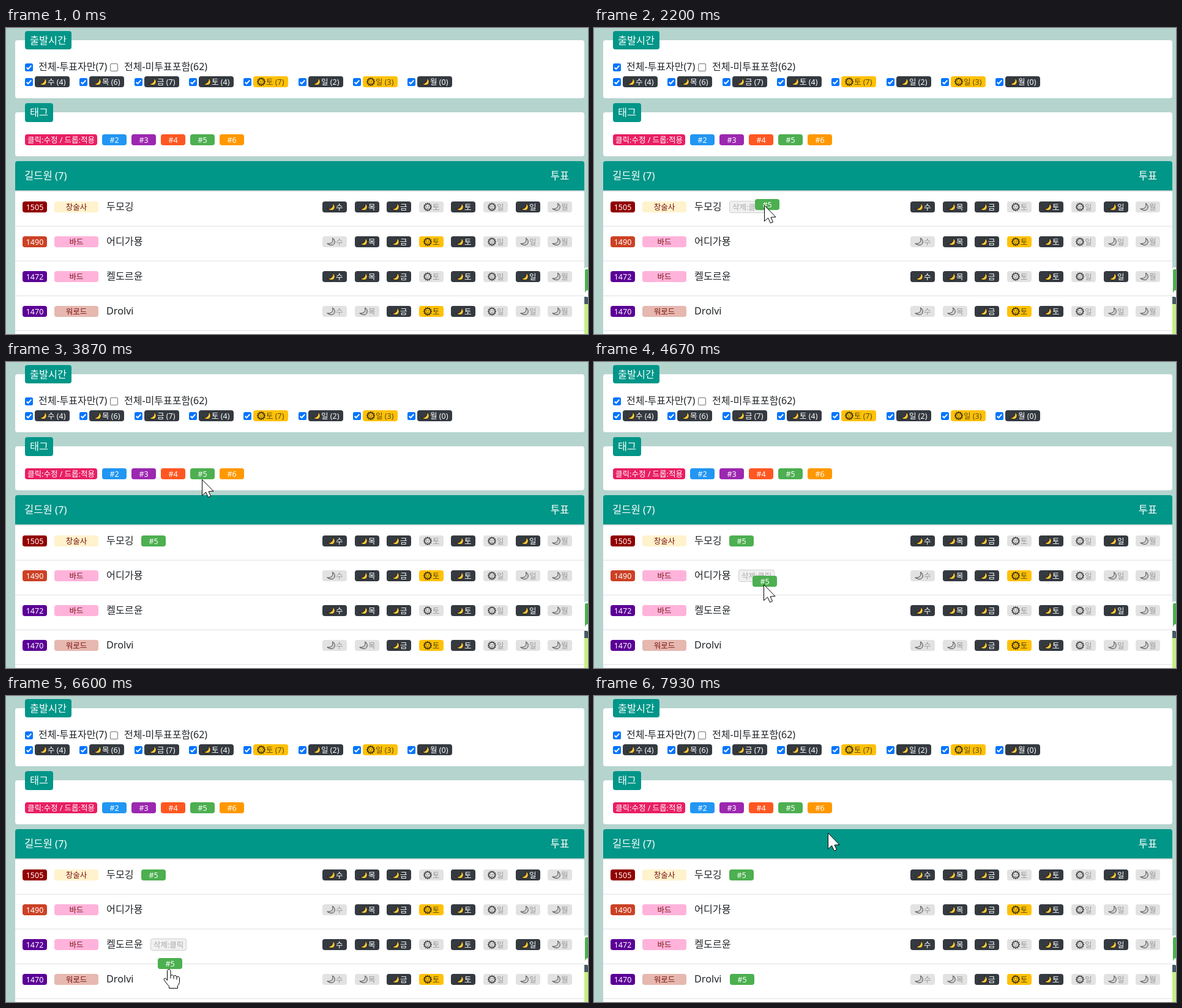
Recreate the animation shown at these times as an HTML page with a canvas. Size 951x501 px, loop 8 s.

```html
<!DOCTYPE html>
<html lang="ko">
<head>
<meta charset="utf-8">
<title>길드원 투표</title>
<style>
html, body { margin: 0; width: 100%; height: 100%; overflow: hidden; background: #b5d4ce; }
canvas { display: block; }
</style>
</head>
<body>
<canvas id="stage" width="951" height="501"></canvas>
<script>
const ctx = document.getElementById('stage').getContext('2d');
const FONT = '"Noto Sans", "Noto Sans CJK KR", "Noto Sans CJK", sans-serif';
const LOOP = 8000, TICK = LOOP / 120, ROW_H = 57;
const TEAL = '#009688', DARK = '#343a40', AMBER = '#ffc107', INK = '#212529', GREEN = '#4caf50';

// A star marks a daytime slot
const times = ['수 (4)', '목 (6)', '금 (7)', '토 (4)', '*토 (7)', '일 (2)', '*일 (3)', '월 (0)'];
const voteDays = ['수', '목', '금', '*토', '토', '*일', '일', '월'];

const members = [
  { level: '1505', color: '#910000', job: '창술사', jobColor: '#fff2cc', name: '두모깅', votes: '11101010', tagX: 221 },
  { level: '1490', color: '#cc4125', job: '바드', jobColor: '#ffb3da', name: '어디가묭', votes: '01111000', tagX: 236 },
  { level: '1472', color: '#5b0096', job: '바드', jobColor: '#ffb3da', name: '켈도르윤', votes: '11101010', tagX: 236 },
  { level: '1470', color: '#5b0096', job: '워로드', jobColor: '#e6b8af', name: 'Drolvi', votes: '00111000', tagX: 222 }
];

const tags = ['#2196f3', '#9c27b0', '#ff5722', GREEN, '#ff9800']
  .map((color, i) => ({ x: 157 + i * 48, w: 40, text: '#' + (i + 2), color }));
tags.unshift({ x: 31, w: 118, text: '클릭:수정 / 드롭:적용', color: '#e91e63' });

// Pointer path: tick, x, y, ticks to wait there
const path = [
  [5, 915, 468], [7, 785, 414], [8, 850, 412, 1], [14, 425, 212], [15, 372, 195],
  [20, 316, 184, 4], [25, 307, 194], [31, 281, 280], [33, 278, 290, 3],
  [42, 427, 326], [49, 226, 286], [58, 320, 192], [62, 319, 188], [63, 313, 202],
  [70, 277, 364, 4], [77, 271, 354, 2], [85, 388, 395], [92, 255, 358],
  [99, 266, 447], [103, 266, 459, 2], [106, 269, 464], [118, 396, 256], [119, 382, 224]
];

// The row keeps the tag from the end of the drag until "gone"
const drags = [
  { from: 25, to: 37, dx: 15, dy: 10, row: 0, gone: 120 },
  { from: 63, to: 80, dx: 18, dy: 14, row: 1, gone: 93 },
  { from: 93, to: 106, dx: 18, dy: 18, row: 3, gone: 120, hand: true }
];

function box(x, y, w, h, r, color) {
  ctx.fillStyle = color;
  ctx.beginPath();
  ctx.roundRect(x, y, w, h, r);
  ctx.fill();
}

function label(str, x, y, size, color, align = 'left') {
  ctx.font = size + 'px ' + FONT;
  ctx.textAlign = align;
  ctx.fillStyle = color;
  ctx.fillText(str, x, y);
}

function pill(x, y, w, str, color, ink = '#fff') {
  box(x, y, w, 18, 4, color);
  label(str, x + w / 2, y + 13.5, 12.5, ink, 'center');
}

const tag = (x, y) => pill(x, y, 40, '#5', GREEN);

function slot(x, y) {
  box(x, y - 1, 59, 20, 4, '#d0d0d0');
  box(x + 1, y, 57, 18, 3, '#f0f0f0');
  label('삭제:클릭', x + 5, y + 13.5, 12.5, '#aaa');
}

function check(x, y, on) {
  box(x, y, 13, 13, 2.5, on ? '#0075ff' : '#767676');
  if (!on) return box(x + 1, y + 1, 11, 11, 1.5, '#fff');
  ctx.strokeStyle = '#fff';
  ctx.lineWidth = 2;
  ctx.beginPath();
  ctx.moveTo(x + 2.7, y + 6.7);
  ctx.lineTo(x + 5.2, y + 9.2);
  ctx.lineTo(x + 10.3, y + 3.6);
  ctx.stroke();
}

function moon(on) {
  ctx.beginPath();
  ctx.moveTo(2.5, -6);
  ctx.bezierCurveTo(10, -2, 6, 11, -6.2, 3);
  ctx.bezierCurveTo(0.5, 4, 4.5, -0.5, 2.5, -6);
  ctx.closePath();
  ctx.fillStyle = on ? '#ffc83d' : '#d0d0d0';
  ctx.strokeStyle = on ? '#1c1c1c' : '#444';
  ctx.lineWidth = 1;
  ctx.fill();
  ctx.stroke();
}

function sun(on) {
  ctx.strokeStyle = ctx.fillStyle = on ? '#3a2f08' : '#444';
  ctx.lineWidth = 1.5;
  for (let i = 0; i < 12; i++) {
    ctx.rotate(Math.PI / 6);
    ctx.fillRect(4.8, -0.8, 2.2, 1.6);
  }
  ctx.beginPath();
  ctx.arc(0, 0, 5, 0, 7);
  ctx.stroke();
  for (const x of [-2.3, 1.1]) ctx.fillRect(x, -1.8, 1.2, 1.4);
  ctx.lineWidth = 0.8;
  ctx.beginPath();
  ctx.arc(0, 0.4, 2.2, 0.4, 2.74);
  ctx.stroke();
}

function dayPill(x, y, w, day, on, iconX) {
  const sunny = day[0] === '*';
  box(x, y, w, 18, 4, !on ? '#e2e2e2' : sunny ? AMBER : DARK);
  ctx.save();
  ctx.translate(x + iconX, y + 9);
  (sunny ? sun : moon)(on);
  ctx.restore();
  label(day.replace('*', ''), x + iconX + 8, y + 13.5, 12.5, !on ? '#999' : sunny ? '#5c4a12' : '#fff');
}

function drawPanels() {
  box(0, 0, 951, 501, 0, '#b5d4ce');

  box(15, 20, 930, 95, 4, '#fff');
  box(31, 5, 76, 30, 4, TEAL);
  label('출발시간', 69, 25.5, 16.3, '#fff', 'center');
  check(31, 58, true);
  label('전체-투표자만(7)', 53, 68.5, 16, INK);
  check(170, 58, false);
  label('전체-미투표포함(62)', 193, 68.5, 16, INK);
  times.forEach((d, i) => {
    const x = Math.round(31 + i * 89.3);
    check(x, 82, true);
    dayPill(x + 16, 79, 57, d, true, 13);
  });

  box(15, 138, 930, 72, 4, '#fff');
  box(31, 123, 46, 31, 4, TEAL);
  label('태그', 54, 144, 16.3, '#fff', 'center');
  tags.forEach(t => pill(t.x, 174, t.w, t.text, t.color));

  box(15, 218, 930, 60, 4, TEAL);
  label('길드원 (7)', 30, 247.5, 16.6, '#fff');
  label('투표', 905, 247.5, 16.5, '#fff', 'center');
  box(15, 266, 930, 235, 0, '#fff');
  box(15, 266, 930, 2, 0, '#dee2e6');
}

function drawMember(m, i) {
  const y = 284 + i * ROW_H;
  pill(27, y, 40, m.level, m.color);
  pill(79, y, 72, m.job, m.jobColor, '#7a1212');
  label(m.name, 164, y + 13.5, 16.2, INK);
  voteDays.forEach((d, j) => dayPill(Math.round(517 + j * 52.6), y, 40, d, m.votes[j] === '1', 14));
  box(15, y + 40, 930, 1, 0, '#dee2e6');
}

function drawWidget() {
  box(945, 392, 10, 60, 3, '#fff');
  box(946, 395, 10, 40, 2, GREEN);
  box(945, 440, 6, 12, 0, '#455a64');
  box(945, 452, 6, 49, 0, '#c6ef84');
  box(946, 429, 12, 12, 6, '#fff');
}

const ARROW = new Path2D('M0 0V26L6 20.5 10 29 14 27 10.5 19.5 18.5 19Z');
const HAND = new Path2D('M-3 2Q0-2 2.5 2V10Q6 7.5 7.5 11 11 8.5 12.5 12.5 17 10.5 17 15V21Q16 25 14 27V31H0V28L-8 18Q-9 14-6 14.5L-3 18Z');
const KNUCKLES = new Path2D('M2.5 10V15M7.5 11V16M12.5 12.5V17');

function drawPointer(p, useHand) {
  ctx.save();
  ctx.translate(p.x + 0.5, p.y + 0.5);
  ctx.fillStyle = '#fff';
  ctx.strokeStyle = '#000';
  ctx.lineWidth = 1;
  ctx.lineJoin = 'round';
  const shape = useHand ? HAND : ARROW;
  ctx.fill(shape);
  ctx.stroke(shape);
  if (useHand) ctx.stroke(KNUCKLES);
  ctx.restore();
}

function pointerAt(tick) {
  const next = path.findIndex(p => p[0] > tick);
  if (next === 0) return null;
  const b = path.at(next), a = next < 0 ? b : path[next - 1];
  const start = a[0] + (a[3] || 0), span = b[0] - start;
  let k = span > 0 ? Math.max(0, (tick - start) / span) : 0;
  if (span > 6) k = k * k * (3 - 2 * k);
  const mix = n => Math.round(a[n] + (b[n] - a[n]) * k);
  return { x: mix(1), y: mix(2) };
}

function inside(p, x, y, w) {
  return p.x >= x && p.x < x + w && p.y >= y && p.y < y + 18;
}

function draw(tick) {
  const p = pointerAt(tick);
  const drag = drags.find(d => tick >= d.from && tick < d.to);
  const ghost = drag && { x: p.x - drag.dx, y: p.y - drag.dy };
  const target = ghost ? Math.floor((ghost.y + 9 - 268) / ROW_H) : -1;

  drawPanels();
  members.forEach(drawMember);
  drawWidget();

  const held = drags.filter(d => tick >= d.to && tick < d.gone).map(d => ({
    x: members[d.row].tagX + (d.row === target ? 67 : 0),
    y: 284 + d.row * ROW_H
  }));
  if (target >= 0) slot(members[target].tagX, 284 + target * ROW_H);
  held.forEach(t => tag(t.x, t.y));
  if (ghost) tag(ghost.x, ghost.y);

  if (!p) return;
  const over = tags.some(t => inside(p, t.x, 174, t.w)) || held.some(t => inside(p, t.x, t.y, 40));
  drawPointer(p, drag ? drag.hand : over);
}

function frame() {
  draw(Math.floor((performance.now() % LOOP) / TICK + 0.1));
  requestAnimationFrame(frame);
}
frame();
</script>
</body>
</html>
```
